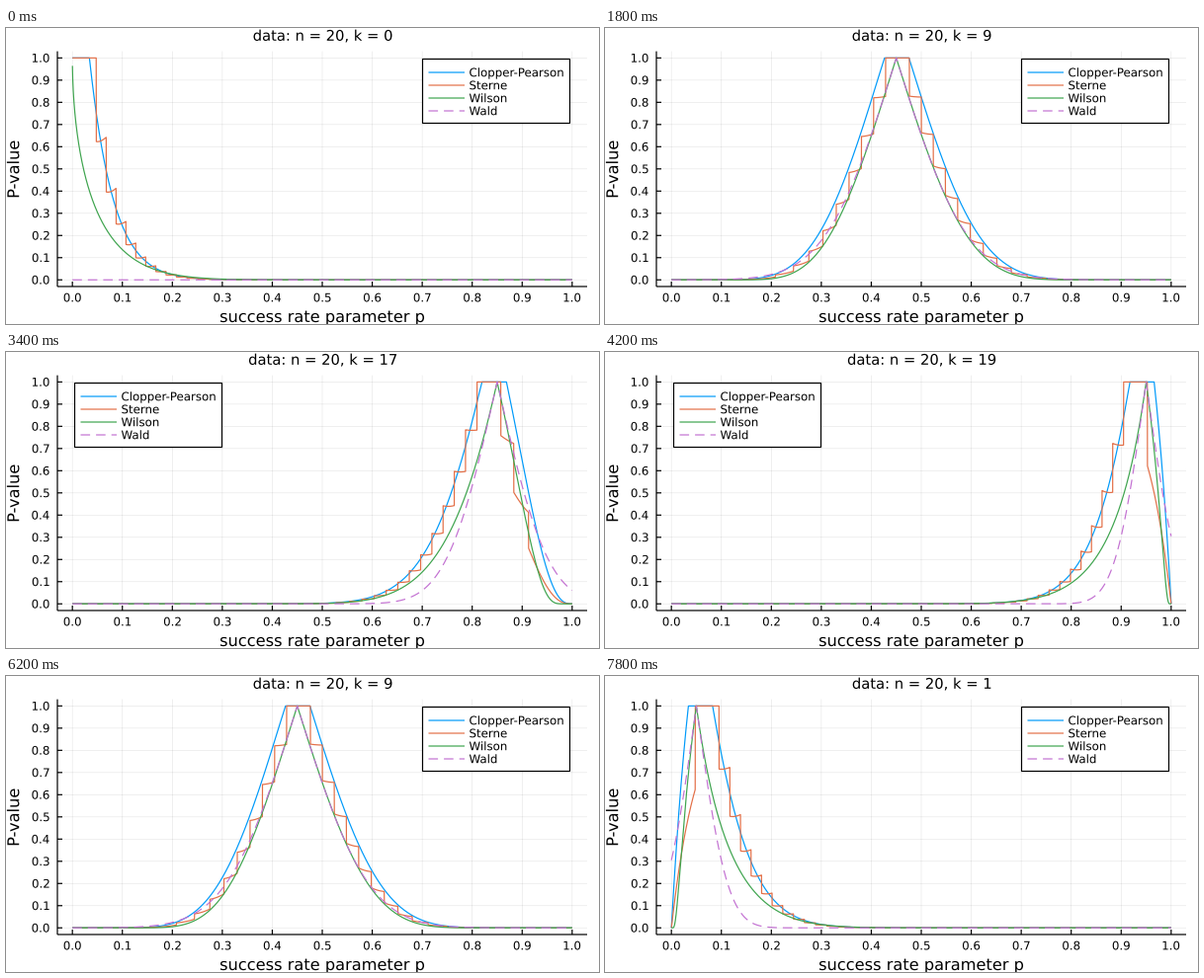
A matplotlib script for the animation above (8 s loop, 600 by 300 pixels).

```python
import math

import matplotlib.pyplot as plt
import numpy as np
from matplotlib.animation import FuncAnimation
from matplotlib.patches import PathPatch, Rectangle
from matplotlib.textpath import TextPath
from matplotlib.transforms import Affine2D

W, H, DPI = 600, 300, 100
LEFT, RIGHT, TOP, BOTTOM = 52, 588, 23.6, 262
PX = 72 / DPI          # points per pixel
FONT = 1.475           # pixels per nominal font point
N = 20

SERIES = [
    ("Clopper-Pearson", (0.0, 0.6056, 0.9787), "-"),
    ("Sterne", (0.8889, 0.4356, 0.2781), "-"),
    ("Wilson", (0.2422, 0.6433, 0.3044), "-"),
    ("Wald", (0.7644, 0.4441, 0.8243), (0, (8, 5))),
]

# Binomial probabilities on a fine grid of p
p = np.linspace(0, 1, 10001)
pmf = np.array([math.comb(N, i) * p**i * (1 - p)**(N - i) for i in range(N + 1)])
cdf = np.cumsum(pmf, axis=0)
erfc = np.vectorize(math.erfc, otypes=[float])


def normal_pvalue(k, variance):
    with np.errstate(divide="ignore", invalid="ignore"):
        z = np.abs(k / N - p) / np.sqrt(variance / N)
    return erfc(z / math.sqrt(2))


def pvalues(k):
    upper = pmf[k:].sum(axis=0)
    clopper = np.minimum(1, 2 * np.minimum(cdf[k], upper))
    sterne = np.where(pmf <= pmf[k] * (1 + 1e-9), pmf, 0).sum(axis=0)
    wilson = normal_pvalue(k, p * (1 - p))
    wald = normal_pvalue(k, k / N * (1 - k / N))
    return clopper, sterne, wilson, wald


def to_x(v):
    return LEFT + (RIGHT - LEFT) * (v + 0.03) / 1.06


def to_y(v):
    return BOTTOM - (BOTTOM - TOP) * (v + 0.03) / 1.06


fig = plt.figure(figsize=(W / DPI, H / DPI), dpi=DPI, facecolor="white")
ax = fig.add_axes([0, 0, 1, 1])
ax.set(xlim=(0, W), ylim=(H, 0))
ax.axis("off")


def text_path(s, x, y, size, align="center", angle=0):
    """Outline of s with its baseline at (x, y), in pixels."""
    path = TextPath((0, 0), s, size=size * FONT, prop={"family": "DejaVu Sans"})
    box = path.get_extents()
    shift = {"left": 0, "center": (box.x0 + box.x1) / 2, "right": box.x1}[align]
    move = Affine2D().translate(-shift, 0).scale(1, -1).rotate_deg(-angle)
    return move.translate(x, y).transform_path(path)


def text(*args, zorder=6, **kw):
    patch = PathPatch(text_path(*args, **kw), fc="black", lw=0, snap=False, zorder=zorder)
    return ax.add_patch(patch)


def line(xs, ys, color="black", width=1.2, **kw):
    kw = {"solid_capstyle": "butt", "dash_capstyle": "butt", "snap": False, **kw}
    return ax.plot(xs, ys, color=color, lw=width * PX, **kw)[0]


def draw_axes():
    for i in range(11):
        v = i / 10
        x, y = to_x(v), to_y(v)
        line([x, x], [TOP, BOTTOM], width=0.6, alpha=0.1, zorder=1)
        line([LEFT, RIGHT], [y, y], width=0.6, alpha=0.1, zorder=1)
        line([x, x], [BOTTOM, BOTTOM - 5], zorder=2)
        line([LEFT, LEFT + 5], [y, y], zorder=2)
        text(f"{v:.1f}", x, 277.4, 8)
        text(f"{v:.1f}", 43.6, y + 4.3, 8, align="right")
    line([LEFT, LEFT], [TOP, BOTTOM], zorder=2)
    line([LEFT, RIGHT], [BOTTOM, BOTTOM], zorder=2)
    text("success rate parameter p", 320, 298, 11)
    text("P-value", 13.2, 142.9, 11, angle=90)


def draw_legend(x):
    box = Rectangle((x, 31.5), 149, 65, fc="white", ec="black", lw=1.2 * PX,
                    snap=False, zorder=5)
    parts = [ax.add_patch(box)]
    for i, (name, color, style) in enumerate(SERIES):
        y = 45 + 13 * i
        parts.append(line([x + 6, x + 42.5], [y, y], color, ls=style, zorder=6))
        parts.append(text(name, x + 47, y + 4.2, 8, align="left"))
    return parts


draw_axes()
legends = {"left": draw_legend(69.5), "right": draw_legend(421.5)}
title = text("data", 320.5, 12.8, 10)
curves = [line([], [], color, ls=style, zorder=3, solid_joinstyle="round")
          for _, color, style in SERIES]


def update(frame):
    k = N - abs(N - frame)
    title.set_path(text_path(f"data: n = {N}, k = {k}", 320.5, 12.8, 10))
    for curve, values in zip(curves, pvalues(k)):
        curve.set_data(to_x(p), to_y(values))
    side = "right" if k <= N / 2 else "left"
    for name, parts in legends.items():
        for part in parts:
            part.set_visible(name == side)
    return [title, *curves]


anim = FuncAnimation(fig, update, frames=2 * N, interval=200, repeat=True,
                     repeat_delay=0, blit=False)
plt.show()
```
